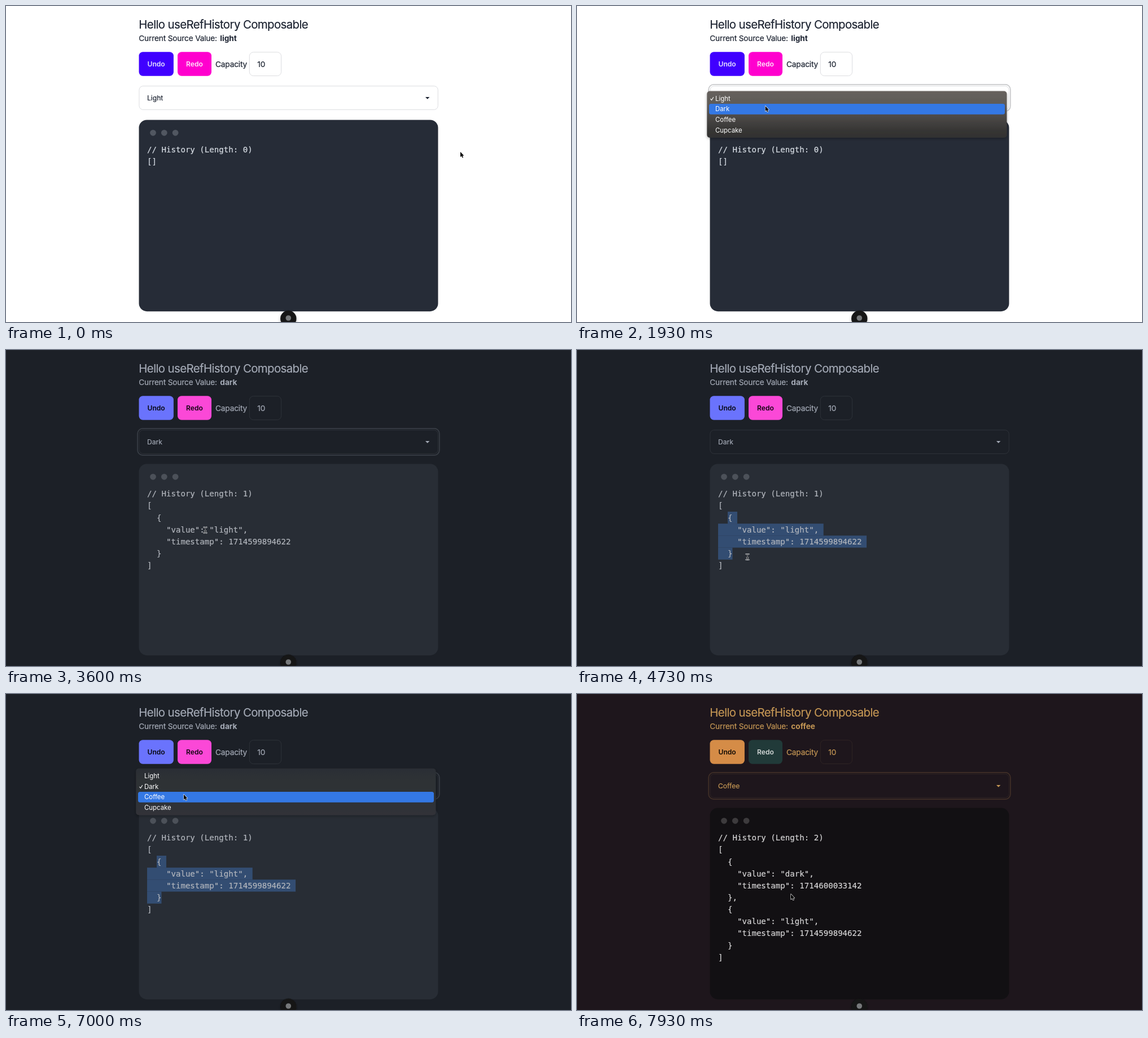
Recreate the animation shown at these times as an HTML page. Size 1001 px wide and 559 px high, loop 8000 ms.

```html
<!DOCTYPE html>
<html lang="en">
<head>
<meta charset="utf-8">
<title>useRefHistory demo</title>
<style>
  html, body { margin: 0; width: 100%; height: 100%; overflow: hidden; }
  svg {
    display: block; width: 100%; height: 100%; background: var(--bg);
    --bg: #fff; --text: #1b2230; --line: #d8dadd; --ring: #c9cacc;
    --panel: #262c37; --dot: #515761; --code: #d7dde4;
  }
  svg[data-theme=dark] {
    --bg: #1c2027; --text: #a4aab6; --line: #30353c; --ring: #383d45;
    --panel: #282d35; --dot: #4c5159; --code: #b2b6bd;
  }
  svg[data-theme=coffee] {
    --bg: #1e161c; --text: #c49654; --line: #322625; --ring: #402f27;
    --panel: #121013; --dot: #3d3b3d; --code: #d6d5d6;
  }
  text { font: 13.65px Inter, "Open Sans", sans-serif; font-optical-sizing: none;
    letter-spacing: -.15px; fill: var(--text); stroke: var(--text); stroke-width: .2px; white-space: pre; }
  .title { font-size: 20.4px; letter-spacing: -.6px; }
  .strong { font-weight: 700; letter-spacing: 0; stroke: none; }
  .label { font-size: 12.1px; font-weight: 600; letter-spacing: 0; text-anchor: middle; stroke: none; }
  .field { font-size: 12.1px; letter-spacing: 0; }
  .code text { font: 14.1px "DejaVu Sans Mono", "Liberation Mono", monospace; letter-spacing: 0;
    fill: var(--code); stroke: var(--code); }
  .menu text { font-size: 11.4px; letter-spacing: 0; fill: #fff; stroke: none; }
  .box { fill: var(--bg); stroke: var(--line); stroke-width: .9; }
</style>
</head>
<body>
<svg viewBox="0 0 1001 559" preserveAspectRatio="none" data-theme="light">
  <defs>
    <linearGradient id="lightMenu" x2="0" y2="1">
      <stop offset="0" stop-color="#66615d"/><stop offset=".3" stop-color="#5e5a57"/>
      <stop offset=".85" stop-color="#363534"/><stop offset="1" stop-color="#323130"/>
    </linearGradient>
    <linearGradient id="darkMenu" x2="0" y2="1">
      <stop offset="0" stop-color="#2c2f34"/><stop offset="1" stop-color="#303338"/>
    </linearGradient>
    <filter id="shadow" x="-20%" y="-20%" width="140%" height="150%">
      <feDropShadow dx="0" dy="2" stdDeviation="2.5" flood-opacity=".3"/>
    </filter>
  </defs>

  <text class="title" x="235.3" y="39.6">Hello useRefHistory Composable</text>
  <text x="235.3" y="62">Current Source Value:</text>
  <text id="source" class="strong" x="379.3" y="62"></text>

  <rect id="undo" x="235.5" y="81.3" width="61.4" height="42.4" rx="7"/>
  <text id="undoLabel" class="label" x="266.1" y="106.6">Undo</text>
  <rect id="redo" x="304" y="81.3" width="60" height="42.4" rx="7"/>
  <text id="redoLabel" class="label" x="334" y="106.6">Redo</text>
  <text x="371" y="107.8">Capacity</text>
  <rect class="box" x="431.3" y="81.7" width="56.3" height="41.8" rx="7"/>
  <text x="445.3" y="107.8" style="letter-spacing: 0">10</text>

  <rect id="ring" x="233.1" y="138.9" width="534.8" height="47.2" rx="9"
    fill="none" stroke="var(--ring)" stroke-width="1.76"/>
  <rect class="box" x="235.9" y="141.6" width="529.4" height="41.8" rx="7"/>
  <text id="choice" class="field" x="250" y="167"></text>
  <path d="M743 161h7.4l-3.7 3.8z" fill="var(--text)"/>

  <g class="code">
    <rect x="235.5" y="201.4" width="530" height="338.8" rx="14.1" fill="var(--panel)"/>
    <path d="M260.5 224.3h40" stroke="var(--dot)" stroke-width="10.8" stroke-linecap="round" stroke-dasharray="0 19.8"/>
    <g id="selection" fill="#334d72"></g>
    <g id="lines"></g>
  </g>

  <circle cx="500.3" cy="553" r="14.2" fill="#131314" filter="url(#shadow)"/>
  <circle cx="500.3" cy="552" r="4.8" fill="#77797b"/>

  <g id="menus"></g>

  <g id="cursor">
    <path id="arrow" d="M0 0V9.2L2.1 7.3 3.6 10.6 5.1 9.9 3.7 6.8H6.4Z" fill="#000"
      stroke="#fff" stroke-width="1.2" stroke-linejoin="round" paint-order="stroke"/>
    <g id="beam" fill="none" stroke-linecap="round">
      <path id="beamShape" d="M-2.5-5Q0-5 0-3V3Q0 5-2.5 5M2.5-5Q0-5 0-3V3Q0 5 2.5 5M-1.2 1.5H1.2" stroke="#d5d7da" stroke-width="1.9"/>
      <use href="#beamShape" style="stroke: #16181c"/>
      <path d="M-2.5-5Q0-5 0-3V3Q0 5-2.5 5M2.5-5Q0-5 0-3V3Q0 5 2.5 5M-1.2 1.5H1.2" stroke="#16181c" stroke-width=".8"/>
    </g>
  </g>
</svg>

<script>
const LOOP = 8000, ROW = 18.8, LINE = 21.16, CHAR = 8.487, LEFT = 250;
const $ = id => document.getElementById(id);
const svg = document.querySelector('svg');
const options = ['Light', 'Dark', 'Coffee', 'Cupcake'];
const stamps = [1714599894622, 1714600033142];
const menus = [{ open: 1470, click: 2470, fill: 'lightMenu' }, { open: 6340, click: 7070, fill: 'darkMenu' }];
const switches = menus.map(menu => menu.click + 460);
const drag = { start: 4270, end: 4730 };
const buttonFills = {
  undo: ['#4000ff', '#6a73fd', '#d58c47'],
  undoLabel: ['#e3e2ff', '#06070f', '#0f0904'],
  redo: ['#ff00ce', '#fb48d7', '#213a39'],
  redoLabel: ['#ffe6fa', '#12040f', '#d2d7d6']
};
const home = { x: 805, y: 258 };
const moves = [
  { start: 430, end: 930, x: 372, y: 169 },
  { start: 1770, end: 2200, x: 309, y: 182 },
  { start: 3370, end: 3600, x: 353, y: 318.5 },
  { start: 3700, end: 4200, x: 266, y: 296 },
  { ...drag, x: 302, y: 366 },
  { start: 4850, end: 5200, x: 383, y: 379 },
  { start: 5370, end: 5530, x: 421, y: 271 },
  { start: 5700, end: 6270, x: 323, y: 160 },
  { start: 6750, end: 7200, x: 313, y: 182 },
  { start: 7450, end: 7930, x: 379, y: 354 }
];

const progress = (t, start, end) => Math.max(0, Math.min(1, (t - start) / (end - start)));
const easeOut = k => 1 - (1 - k) ** 2;
const within = (t, start, end) => t >= start && t < end;
const show = (el, on) => { el.style.display = on ? '' : 'none'; };

function cursorAt(t) {
  return moves.reduce((from, move) => {
    const k = easeOut(progress(t, move.start, move.end));
    return { x: from.x + (move.x - from.x) * k, y: from.y + (move.y - from.y) * k };
  }, home);
}

function historyLines(count) {
  const records = stamps.slice(0, count)
    .map((timestamp, i) => ({ value: options[i].toLowerCase(), timestamp })).reverse();
  return `// History (Length: ${count})\n${JSON.stringify(records, null, 2)}`.split('\n');
}

// The open menu puts its checked row over the select.
function buildMenu(menu, checked) {
  const g = document.createElementNS(svg.namespaceURI, 'g');
  const top = menu.top = 150.6 - checked * ROW;
  const labels = options.map((name, i) =>
    `<text x="245" y="${top + 17 + i * ROW}">${name}</text>`).join('');
  g.setAttribute('class', 'menu');
  g.innerHTML = `
    <rect x="230.3" y="${top}" width="531.2" height="82.4" rx="5" fill="url(#${menu.fill})" filter="url(#shadow)"/>
    <rect class="bar" x="234" width="524" height="${ROW}" rx="3.5" fill="#3478e4"/>
    <path d="M236.4 164l2 2.6 3.4-5.4" fill="none" stroke="#fff" stroke-width="1.1"/>${labels}`;
  $('menus').append(g);
  menu.node = g;
  menu.bar = g.querySelector('.bar');
}

function drawMenu({ node, bar, top, open, click }, t, cursor) {
  const fade = progress(t, click + 80, click + 340);
  const firstRow = top + 3.6;
  const row = Math.floor((cursor.y - firstRow) / ROW);
  show(node, t >= open && fade < 1);
  show(bar, !within(t, click, click + 65));
  bar.setAttribute('y', firstRow + row * ROW);
  node.style.opacity = 1 - fade;
}

// Selects the whole first record, one line after another.
function buildSelection() {
  const record = historyLines(1).slice(2, -1);
  $('selection').innerHTML = record.map((line, i) => {
    const from = i ? 0 : line.indexOf('{');
    const to = line.length + (i < record.length - 1);
    return `<rect x="${LEFT + from * CHAR}" y="${286 + i * LINE}" width="${(to - from) * CHAR}" height="${LINE + .1}"/>`;
  }).join('');
}

function drawSelection(t) {
  const rows = [...$('selection').children];
  const step = (drag.end - drag.start) / rows.length;
  rows.forEach((row, i) => show(row, within(t, drag.start + i * step, switches[1])));
}

let shownTheme = -1;
function setTheme(index) {
  if (index === shownTheme) return;
  shownTheme = index;
  const name = options[index];
  svg.dataset.theme = $('source').textContent = name.toLowerCase();
  $('choice').textContent = name;
  $('lines').innerHTML = historyLines(index)
    .map((line, i) => `<text x="${LEFT}" y="${259.2 + i * LINE}">${line}</text>`).join('');
}

function drawButtons(t, index) {
  const changed = index ? switches[index - 1] : -LOOP;
  const mix = progress(t, changed, changed + 200) * 100;
  for (const [id, fills] of Object.entries(buttonFills)) {
    const from = fills[Math.max(0, index - 1)];
    $(id).style.fill = `color-mix(in srgb, ${fills[index]} ${mix}%, ${from})`;
  }
}

function drawCursor(t, { x, y }) {
  const overText = within(t, 3450, 5500);
  $('cursor').setAttribute('transform', `translate(${x} ${y})`);
  show($('beam'), overText);
  show($('arrow'), !overText);
}

function render(now) {
  const t = Math.max(0, now - start) % LOOP;
  const theme = switches.filter(time => t >= time).length;
  const cursor = cursorAt(t);
  setTheme(theme);
  drawButtons(t, theme);
  show($('ring'), within(t, 1400, drag.start) || t >= 6200);
  drawSelection(t);
  menus.forEach(menu => drawMenu(menu, t, cursor));
  drawCursor(t, cursor);
  requestAnimationFrame(render);
}

menus.forEach(buildMenu);
buildSelection();
const start = performance.now();
render(start);
</script>
</body>
</html>
```
